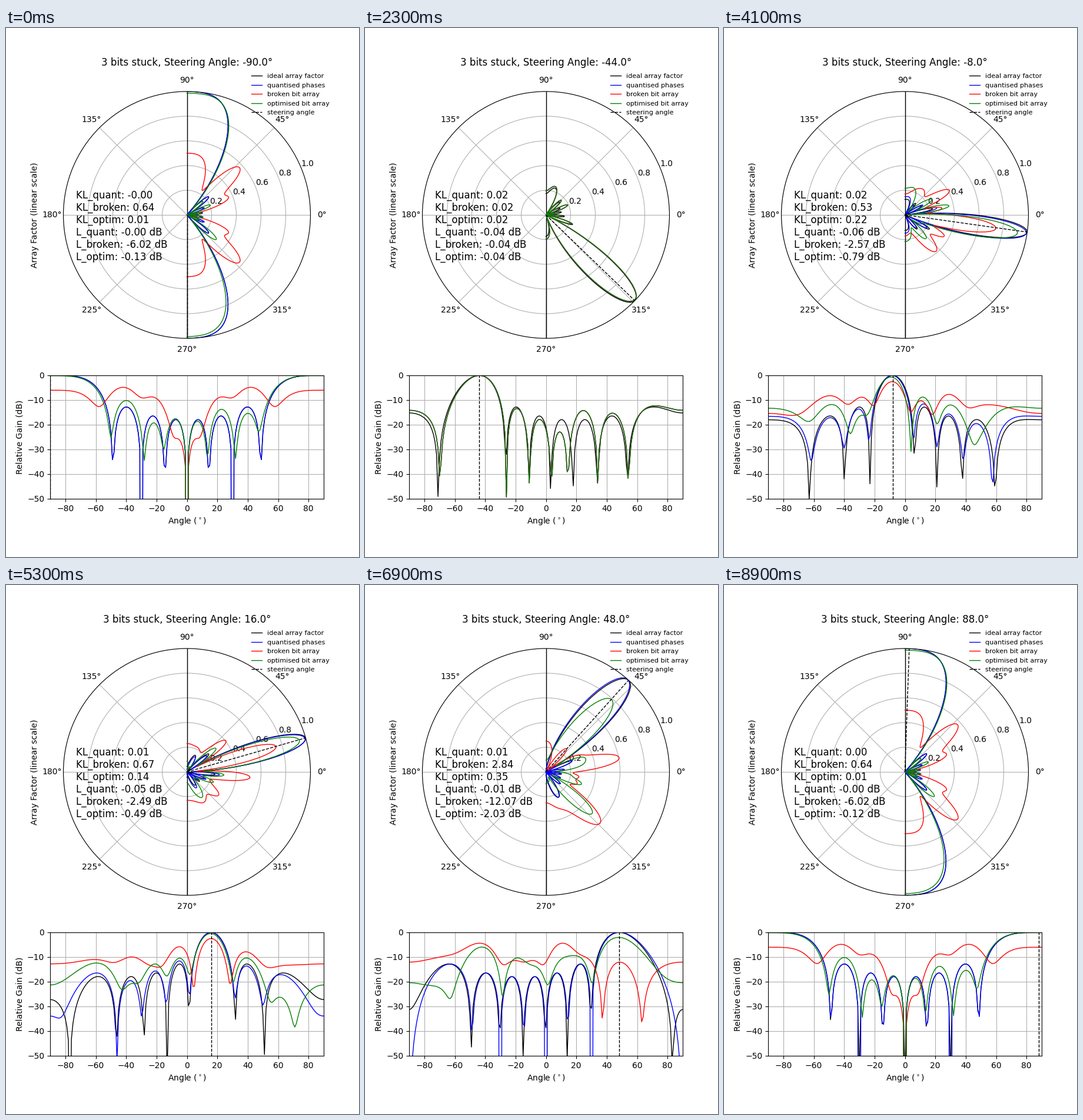
A matplotlib script that plays this animation: 600 px wide and 900 px high, repeating every 9 s.

```python
import numpy as np
import matplotlib.pyplot as plt
from matplotlib.animation import FuncAnimation

N = 8                      # elements, half-wavelength spacing
LEVELS = 16                # 4-bit phase shifters
STUCK = {2: 1, 3: 0, 6: 0}  # element -> value its top bit is stuck at
FRAMES, STEP = 90, 2

deg = np.arange(-90, 91)
theta = np.radians(deg)
idx = np.arange(N)
steering = np.exp(1j * np.pi * np.outer(np.sin(theta), idx))


def pattern(phase):
    af = np.abs(steering @ np.exp(1j * phase)) / N
    return np.maximum(af, 1e-16)


def break_bits(codes):
    out = codes.copy()
    for n, bit in STUCK.items():
        out[n] = codes[n] % 8 + 8 * bit
    return out


def optimise(codes):
    """Move each stuck element to the nearest phase it can still reach."""
    out = codes.copy()
    for n, bit in STUCK.items():
        reach = np.arange(8) + 8 * bit
        gap = np.abs((reach - codes[n] + 8) % LEVELS - 8)
        out[n] = reach[np.argmin(gap)]
    return out


def kl(p, q):
    p, q = p**2 / np.sum(p**2), q**2 / np.sum(q**2)
    return np.sum(p * np.log(p / q))


def patterns(steer):
    ideal = -np.pi * idx * np.sin(np.radians(steer))
    unit = 2 * np.pi / LEVELS
    codes = np.round(ideal / unit).astype(int) % LEVELS
    sets = (codes, break_bits(codes), optimise(codes))
    return [pattern(ideal)] + [pattern(c * unit) for c in sets]


def report(steer, afs):
    ideal, at = afs[0], steer + 90
    eps = 1e-9 * (steer != 0)   # sign of a rounded-off zero
    names = ("quant", "broken", "optim")
    rows = [f"KL_{k}: {kl(ideal, a) - eps:.2f}" for k, a in zip(names, afs[1:])]
    rows += [f"L_{k}: {20 * np.log10(a[at] / ideal[at]) - eps:.2f} dB"
             for k, a in zip(names, afs[1:])]
    return "\n".join(rows)


fig = plt.figure(figsize=(6, 9), dpi=100)
grid = fig.add_gridspec(2, 1, height_ratios=[2, 1])
polar = fig.add_subplot(grid[0], projection="polar")
gain = fig.add_subplot(grid[1])

polar.set_ylim(0, 1)
polar.set_yticks([0.2, 0.4, 0.6, 0.8, 1.0])
polar.set_ylabel("Array Factor (linear scale)", labelpad=30)
for side in (-np.pi / 2, np.pi / 2):
    polar.plot([side, side], [0, 1], "k", lw=1)

gain.set(xlim=(-90, 90), ylim=(-50, 0), xticks=range(-80, 81, 20),
         xlabel=r"Angle ($^\circ$)", ylabel="Relative Gain (dB)")
gain.grid()

styles = [("ideal array factor", "black"), ("quantised phases", "blue"),
          ("broken bit array", "red"), ("optimised bit array", "green")]
polar_lines = [polar.plot([], [], color=c, lw=1, label=s)[0] for s, c in styles]
gain_lines = [gain.plot([], [], color=c, lw=1)[0] for _, c in styles]
pointer, = polar.plot([], [], "k--", lw=1, label="steering angle")
marker, = gain.plot([], [], "k--", lw=1)

title = fig.text(0.5125, 836 / 900, "", size=12, ha="center", va="baseline")
stats = polar.text(0.05, 0.6, "", size=12, va="top", transform=polar.transAxes)
polar.legend(loc="upper left", bbox_to_anchor=(417 / 600, 823 / 900),
             bbox_transform=fig.transFigure, fontsize=8, frameon=False,
             borderpad=0, borderaxespad=0, handlelength=1.6)


def update(i):
    steer = -90 + STEP * i
    afs = patterns(steer)
    for pl, gl, af in zip(polar_lines, gain_lines, afs):
        pl.set_data(theta, af)
        gl.set_data(deg, 20 * np.log10(af))
    pointer.set_data([np.radians(steer)] * 2, [0, 1])
    marker.set_data([steer, steer], [-50, 0])
    title.set_text(f"3 bits stuck, Steering Angle: {steer:.1f}°")
    stats.set_text(report(steer, afs))
    return [*polar_lines, *gain_lines, pointer, marker, title, stats]


anim = FuncAnimation(fig, update, frames=FRAMES, interval=100,
                     repeat=True, repeat_delay=0, blit=False)
plt.show()
```
